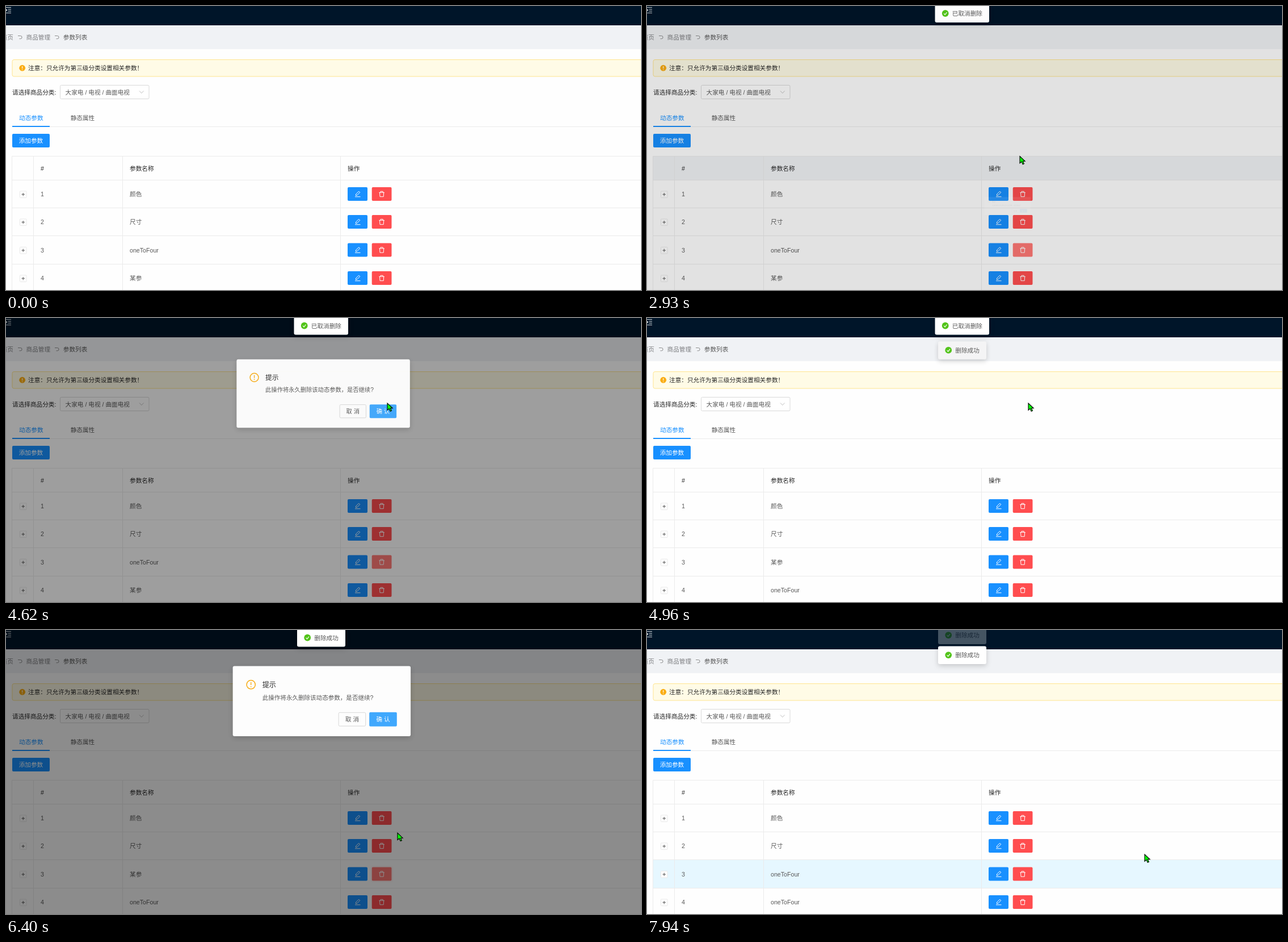
Animation, 1119 px wide and 500 px high, one loop 7990 ms. Source, as an HTML page:

```html
<!DOCTYPE html>
<html lang="zh-CN">
<head>
<meta charset="utf-8">
<title>参数列表</title>
<style>
html, body { margin: 0; width: 100%; height: 100%; overflow: hidden; background: #fff; }
svg { display: block; font: 10.65px "Liberation Sans", "Noto Sans CJK SC", "Noto Sans CJK", sans-serif; }
text { white-space: pre; }
.line { fill: none; stroke: #ebebeb; }
.icon { fill: none; stroke: #fff; stroke-width: 1; }
.shadow { filter: drop-shadow(0 3px 5px rgba(0,0,0,.18)); }
</style>
</head>
<body>
<svg id="stage" width="1119" height="500" viewBox="0 0 1119 500"></svg>
<script>
const LOOP = 7990;
const DARK = '#262626', MID = '#595959', BLUE = '#1890ff', RED = '#ff4d4f', RED_LIT = '#ff7875';
const ORIGIN = [663, 432];
const ROW_Y = [331, 380, 429.5, 479];

const rect = (x, y, w, h, fill, more = '') =>
  `<rect x="${x}" y="${y}" width="${w}" height="${h}" fill="${fill}" ${more}/>`;
const label = (x, y, s, fill = MID, more = '') => `<text x="${x}" y="${y}" fill="${fill}" ${more}>${s}</text>`;
const path = (d, more) => `<path d="${d}" ${more}/>`;

const separator = x => path(`M${x} 52.5h4.5a2.6 2.6 0 0 1 0 5.2h-2`, 'fill="none" stroke="#808080" stroke-width=".9"');

function tableRow(y, i) {
  return rect(24.5, y - 5, 11.5, 11.5, '#fff', 'stroke="#e8e8e8" rx="1"') +
    path(`M27.5 ${y + .7}h5.5M30.2 ${y - 2}v5.5`, `stroke="${MID}" stroke-width="1"`) +
    label(61, y + 4, i + 1) +
    label(218, y + 4, '', MID, `id="name${i}"`) +
    rect(602, y - 12, 35, 24, BLUE, 'rx="2"') +
    path(`M615 ${y + 4.8}h9.5M616.3 ${y + 2.6}l.4-2.4 5-5 2 2-5 5z`, 'class="icon"') +
    rect(644.7, y - 12, 34.8, 24, RED, `rx="2" id="trash${i}"`) +
    path(`M657.3 ${y - 2.6}h9.6M660 ${y - 2.6}v-2h4.2v2M658.5 ${y - 2.6}l.5 7.3h6.2l.5-7.3`, 'class="icon"');
}

const page = () =>
  rect(0, 0, 1119, 500, '#fefefe') +
  rect(0, 0, 1119, 34, '#001529') +
  path('M0 2.5h9M3.5 5.8h5.5M3.5 9h5.5M0 12.2h9M0 5.5v3.6l2-1.8z', 'stroke="#d8dce0" fill="#d8dce0" stroke-width="1"') +
  rect(0, 34, 1119, 42, '#f0f2f5') +
  label(-8.3, 58.5, '首页', '#7d7e80') + separator(21) +
  label(35.5, 58.5, '商品管理', '#7d7e80') + separator(86) +
  label(100.8, 58.5, '参数列表') +
  rect(11, 94.5, 1130, 29.5, '#fffbe6', 'stroke="#ffe58f" rx="3"') +
  '<circle cx="28.7" cy="109.2" r="5.4" fill="#faad14"/>' +
  path('M28.7 106v4M28.7 111.3v1.2', 'stroke="#fff" stroke-width="1.1"') +
  label(39, 113, '注意：只允许为第三级分类设置相关参数！', DARK) +
  label(11, 155.5, '请选择商品分类:', DARK) +
  rect(95.5, 139.5, 156.5, 24, '#fff', 'stroke="#d9d9d9" rx="2"') +
  label(104.5, 155.5, '大家电 / 电视 / 曲面电视') +
  path('M235 149.5l3.8 4 3.8-4', 'fill="none" stroke="#bfbfbf"') +
  path('M11 212.5H1119', 'class="line"') +
  rect(11, 211, 66, 2, BLUE) +
  label(23, 200.5, '动态参数', BLUE) + label(113.7, 200.5, '静态属性') +
  rect(11, 225, 66, 24, BLUE, 'rx="2"') +
  label(22.7, 241, '添加参数', '#fff', 'font-weight="500"') +
  rect(11, 264.5, 1108, 42, '#f0f2f5', 'id="headHover"') +
  rect(11, 405, 1108, 49, '#e6f7ff', 'id="rowHover"') +
  path('M1119 264.5H10.5V500M10.5 306.5H1119M10.5 355.5H1119M10.5 404.5H1119M10.5 454.5H1119' +
    'M48.5 264.5V500M205.5 264.5V500M589.5 264.5V500', 'class="line"') +
  label(61, 289.5, '#', DARK) + label(218, 289.5, '参数名称', DARK) + label(602, 289.5, '操作', DARK) +
  ROW_Y.map(tableRow).join('') +
  rect(643.5, 416.3, 37.2, 26.4, 'none', 'id="wave" rx="3" stroke="#ffd9d8" stroke-width="2.5"');

const modal = () => '<g id="modal" class="shadow">' +
  rect(397.5, 60.5, 316, 124.5, '#fff', 'rx="3"') +
  '<circle cx="429.8" cy="93.5" r="7.7" fill="none" stroke="#faad14" stroke-width="1.5"/>' +
  path('M429.8 89v5.4M429.8 96.2v1.8', 'stroke="#faad14" stroke-width="1.4"') +
  label(450, 98.3, '提示', DARK, 'font-size="12.2"') +
  label(450, 120, '此操作将永久删除该动态参数，是否继续?') +
  rect(585.5, 143, 48, 24, '#fff', 'stroke="#d9d9d9" rx="2"') +
  label(609.5, 159, '取 消', MID, 'text-anchor="middle"') +
  rect(640, 142.5, 49, 25, '#40a9ff', 'rx="2"') +
  label(664.5, 159, '确 认', '#fff', 'text-anchor="middle" font-weight="500"') + '</g>';

// Toasts: [start, left edge, width, text]
const TOASTS = [
  [2720, 507.5, 95.5, '已取消删除'],
  [4760, 513, 85, '删除成功'],
  [7330, 513, 85, '删除成功']
];
const TOAST_STAY = 3050, TOAST_STEP = 43.8;

const toast = ([, x, w, s], i) => `<g id="toast${i}" class="shadow">` +
  rect(x, -2, w, 31.5, '#fff', `rx="3" id="panel${i}"`) +
  `<circle cx="${x + 18.2}" cy="13.5" r="5.9" fill="#52c41a"/>` +
  path(`M${x + 15.6} 13.6l2 2.2 3.4-4.3`, 'class="icon" style="stroke-width:1.2"') +
  label(x + 30.3, 17.5, s) + '</g>';

document.getElementById('stage').innerHTML = page() +
  rect(0, 0, 1119, 500, '#000', 'id="mask"') + modal() + TOASTS.map(toast).join('') +
  path('M0 0V12.2L3 9.6L5.2 14.2L7.4 13.2L5.4 8.8H9.2Z', 'id="cursor" fill="#0f0" stroke="#000" stroke-width="1.1"');

const $ = id => document.getElementById(id);
const set = (id, attrs) => { for (const k in attrs) $(id).setAttribute(k, attrs[k]); };
const clamp = v => Math.min(1, Math.max(0, v));

function bezier(x1, y1, x2, y2) {
  const at = (u, a, b) => 3 * u * (1 - u) ** 2 * a + 3 * u * u * (1 - u) * b + u ** 3;
  return v => {
    const x = clamp(v);
    if (x === 0 || x === 1) return x;
    let lo = 0, hi = 1;
    for (let i = 0; i < 24; i++) {
      const m = (lo + hi) / 2;
      if (at(m, x1, x2) < x) lo = m; else hi = m;
    }
    return at(lo, y1, y2);
  };
}
const outCirc = bezier(.08, .82, .17, 1);
const inOutCirc = bezier(.78, .14, .15, .86);
const ease = bezier(.25, .1, .25, 1);

// Confirm dialogs: [open, close]
const DIALOGS = [[1608, 2780], [3772, 4590], [6187, 7130]];

// Pointer stops: [time, x, y]
const POINTER = [
  [500, 861, 490], [1080, 663, 432], [2110, 663, 432], [2520, 606, 157], [2780, 606, 157],
  [2930, 657, 264], [3250, 663, 432], [3760, 663, 432], [3870, 690, 245], [4150, 672, 150],
  [5370, 672, 150], [6000, 663, 432], [6240, 663, 432], [6400, 690, 358], [6750, 672, 152],
  [7180, 672, 152], [7640, 1023, 430], [7800, 1023, 430], [7940, 877, 395]
];

function pointerAt(t) {
  const i = POINTER.findIndex(p => p[0] > t);
  if (i < 0) return POINTER[POINTER.length - 1].slice(1);
  const a = POINTER[Math.max(0, i - 1)], b = POINTER[i];
  const k = clamp((t - a[0]) / (b[0] - a[0]));
  return [a[1] + (b[1] - a[1]) * k, a[2] + (b[2] - a[2]) * k];
}

function drawDialog(t) {
  const d = DIALOGS.find(([open, close]) => t >= open && t < close + 200);
  let dim = 0, p = 0, ring = 0;
  if (d) {
    const [open, close] = d;
    dim = t < close ? clamp((t - open) / 200) : 1 - clamp((t - close) / 200);
    p = t < close ? outCirc((t - open) / 300) : 1 - inOutCirc((t - close) / 200);
    ring = .5 * (1 - clamp((t - open) / 400));
  }
  const s = .2 + .8 * p, [x, y] = ORIGIN;
  set('mask', { opacity: .45 * dim });
  set('modal', { opacity: p, transform: `translate(${x} ${y}) scale(${s}) translate(${-x} ${-y})` });
  set('wave', { opacity: ring });
}

function drawToasts(t) {
  let top = 0;
  TOASTS.forEach(([start], i) => {
    const p = outCirc((t - start) / 300);
    const gone = ease((t - start - TOAST_STAY) / 300);
    const y = top - TOAST_STEP * (1 - p) - 6.1 * gone;
    set('toast' + i, { opacity: p * (1 - gone), transform: `translate(0 ${y})` });
    if (t >= start) top += Math.min(TOAST_STEP - 12.2 * gone, 114 * (1 - gone));
  });
  set('panel1', { fill: t < 5370 ? '#f5f5f5' : '#fff' });
}

function draw(t) {
  const names = t < 4880 ? ['oneToFour', '某参'] : t < 7400 ? ['某参', 'oneToFour'] : ['oneToFour', 'oneToFour'];
  ['颜色', '尺寸', ...names].forEach((s, i) => { $('name' + i).textContent = s; });
  const lit = (t >= 1050 && t < 4880) || (t >= 5970 && t < 7400);
  set('trash2', { fill: lit ? RED_LIT : RED });
  set('headHover', { opacity: clamp((t - 2880) / 50) * (1 - clamp((t - 2960) / 200)) });
  set('rowHover', { opacity: clamp((t - 7560) / 200) });
  drawDialog(t);
  drawToasts(t);
  const [x, y] = pointerAt(t);
  set('cursor', { transform: `translate(${x} ${y})`, opacity: t < 500 ? 0 : 1 });
}

const begin = performance.now();
function tick() {
  draw((performance.now() - begin) % LOOP);
  requestAnimationFrame(tick);
}
tick();
</script>
</body>
</html>
```
